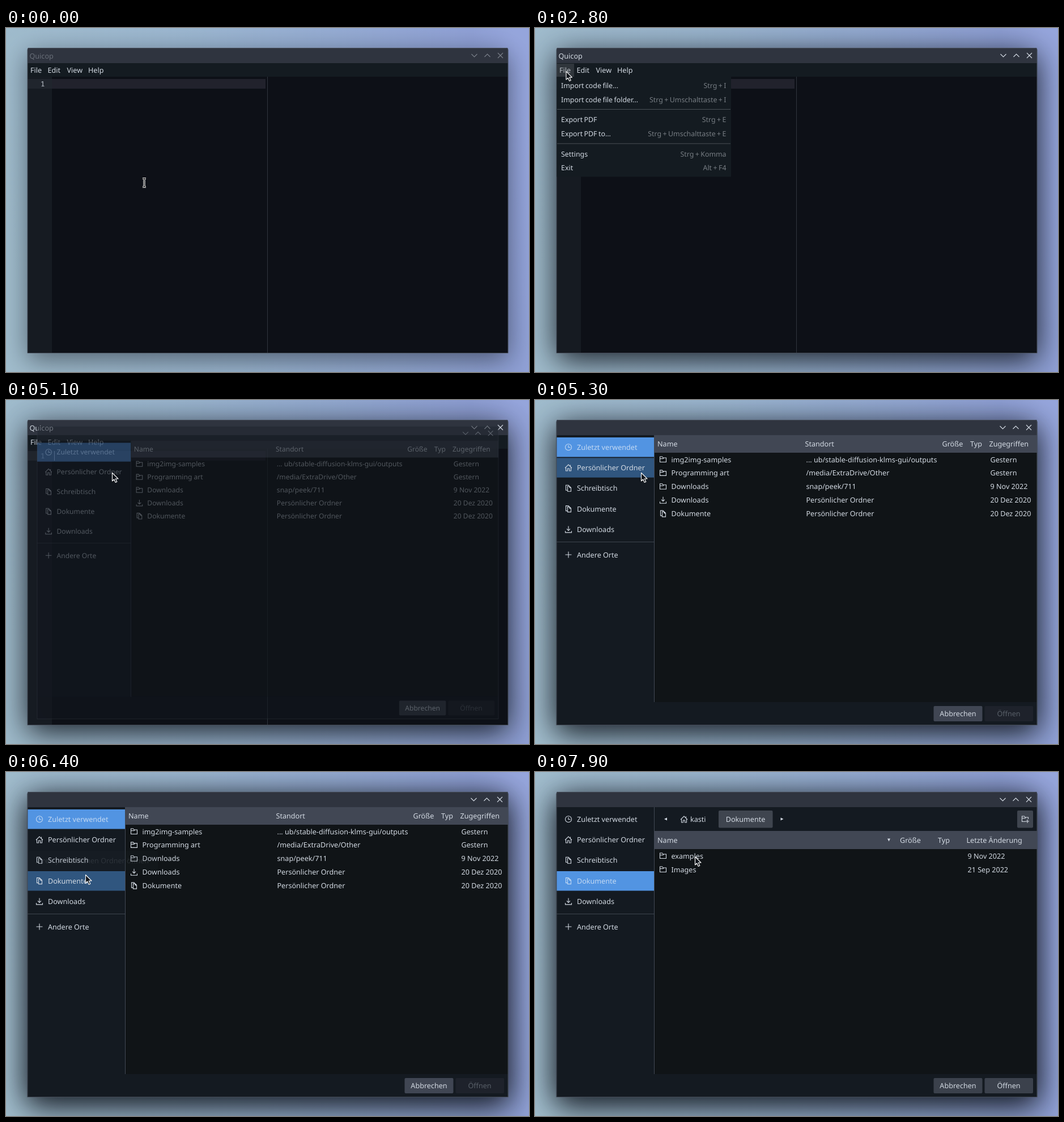
These frames come from a looping animation (923x607 px, 8000 ms). An HTML page with a canvas:

```html
<!DOCTYPE html>
<html lang="de">
<head>
<meta charset="utf-8">
<style>
html, body { margin: 0; width: 100%; height: 100%; overflow: hidden; background: #9cb5cd; }
canvas { display: block; }
</style>
</head>
<body>
<canvas id="stage" width="923" height="607"></canvas>
<script>
const ctx = document.getElementById('stage').getContext('2d');
const LOOP = 8000;
const FG = '#d3dae3', DIM = '#777d83', PANEL = '#141a21', BLUE = '#5294e2';

// pointer tip: time, x, y
const PATH = [
  [400, 244, 273], [1300, 56, 87], [1600, 48, 70], [2400, 48, 70], [2500, 49, 74],
  [2700, 49, 74], [3600, 208, 135], [4200, 187, 128], [5900, 187, 128],
  [6400, 140, 181], [6700, 140, 183], [7100, 140, 186], [7500, 176, 166], [7900, 282, 149]
];

const ICONS = {
  clock: 'M5.5 0A5.5 5.5 0 1 1 -5.5 0A5.5 5.5 0 1 1 5.5 0M0 -3.5V.5H3.5',
  home: 'M-6 .5L0 -5.5L6 .5M-4.5 0V5.5H-1.5V1.5H1.5V5.5H4.5V0M3.5 -5V-3',
  docs: 'M-1.5 -3.5H2L4.5 -1V5.5H-1.5ZM2 -3.5V-1H4.5M-2 3.5H-4.5V-5.5H0L1.5 -4',
  down: 'M0 -6V2M-3 -1L0 2L3 -1M-5.5 2.5V5.5H5.5V2.5',
  plus: 'M-5.5 0H5.5M0 -5.5V5.5',
  folder: 'M-5.5 -5H-1.5L0 -3H5.5V4.5H-5.5ZM-5.5 -1.5H0L1.5 -3',
  newFolder: 'M1 4.5H-5.5V-5H-1.5L0 -3H5.5V0M-5.5 -1.5H0L1.5 -3M4 1V7M1 4H7',
  low: 'M-5 -2.5L0 2.5L5 -2.5',
  high: 'M-5 2.5L0 -2.5L5 2.5',
  close: 'M-4.5 -4.5L4.5 4.5M4.5 -4.5L-4.5 4.5'
};

const clamp = v => Math.max(0, Math.min(1, v));
const ramp = (t, from, to) => clamp((t - from) / (to - from));

function rect(x, y, w, h, color, r = 0) {
  ctx.fillStyle = color;
  ctx.beginPath();
  ctx.roundRect(x, y, w, h, r);
  ctx.fill();
}

function icon(name, x, y, color = FG) {
  ctx.save();
  ctx.translate(x, y);
  ctx.strokeStyle = color;
  ctx.lineWidth = 1.1;
  ctx.stroke(new Path2D(ICONS[name]));
  ctx.restore();
}

// y is the middle of the capitals
function text(s, x, y, color = FG, align = 'left', size = 12.6) {
  ctx.font = `${size}px "Noto Sans", sans-serif`;
  ctx.textAlign = align;
  ctx.fillStyle = color;
  ctx.fillText(s, x, y + 4.5);
}

function triangle(x, y, dx, dy) {
  ctx.fillStyle = FG;
  ctx.beginPath();
  ctx.moveTo(x + dx, y + dy);
  ctx.lineTo(x - dx - dy, y - dy - dx);
  ctx.lineTo(x - dx + dy, y - dy + dx);
  ctx.fill();
}

function pointerAt(t) {
  let i = PATH.findIndex(p => p[0] >= t);
  if (i < 0) i = PATH.length - 1;
  if (i === 0) return PATH[0].slice(1);
  const [t0, x0, y0] = PATH[i - 1], [t1, x1, y1] = PATH[i];
  const k = ramp(t, t0, t1), e = k * k * (3 - 2 * k);
  return [x0 + (x1 - x0) * e, y0 + (y1 - y0) * e];
}

function wallpaper() {
  const g = ctx.createLinearGradient(0, 330, 923, 200);
  g.addColorStop(0, '#9fbbcb');
  g.addColorStop(.4, '#9ab5cf');
  g.addColorStop(.7, '#93a9d2');
  g.addColorStop(.92, '#8e9fd4');
  g.addColorStop(1, '#95a5dc');
  rect(0, 0, 923, 607, g);
}

function shadow(alpha, blur, dy) {
  ctx.save();
  ctx.shadowColor = `rgba(8,12,20,${alpha})`;
  ctx.shadowBlur = blur;
  ctx.shadowOffsetY = dy;
  rect(38, 35, 848, 539, '#0d1017', 3);
  ctx.restore();
}

function frame(shift, color) {
  rect(38, 35, 848, 27, '#2f343f', [3, 3, 0, 0]);
  ['low', 'high', 'close'].forEach((n, i) => icon(n, 826.5 - shift + 23 * i, 48.5, color));
}

function border() {
  ctx.strokeStyle = '#454c58';
  ctx.lineWidth = 1;
  ctx.beginPath();
  ctx.roundRect(38, 35.5, 848, 538, [3, 3, 0, 0]);
  ctx.stroke();
}

function editor(t, menuAlpha) {
  const active = t >= 1800, titleColor = active ? FG : '#686e78';
  rect(38, 62, 848, 511, '#0d1017');
  frame(0, active ? FG : '#7b818b');
  text('Quicop', 41.5, 49, titleColor);
  rect(38, 62, 848, 24, '#141b21');
  rect(38, 86, 43, 487, '#161b22');
  rect(38, 90, 43, 17, '#20252d');
  rect(81, 90, 377, 17, '#21222c');
  rect(461, 86, 1, 487, '#30353d');
  ctx.font = '12.5px "Noto Sans Mono", monospace';
  ctx.textAlign = 'left';
  ctx.fillStyle = '#c5ccd5';
  ctx.fillText('1', 61, 103);
  if (active) rect(85, 90, 1, 17, '#e6e9ee');
  if (menuAlpha) rect(38, 63, 31, 23, '#30363c');
  [['File', 43], ['Edit', 73.5], ['View', 107.5], ['Help', 145]].forEach(([s, x], i) =>
    text(s, x, 74, menuAlpha && !i ? '#b9bec4' : FG));
  border();
}

function menu(alpha, my) {
  const items = [
    ['Import code file...', 'Strg + I', 101.5],
    ['Import code file folder...', 'Strg + Umschalttaste + I', 126.5],
    ['Export PDF', 'Strg + E', 161.5],
    ['Export PDF to...', 'Strg + Umschalttaste + E', 186.5],
    ['Settings', 'Strg + Komma', 222],
    ['Exit', 'Alt + F4', 246.5]
  ];
  ctx.save();
  ctx.globalAlpha = alpha;
  rect(38.5, 86, 307.5, 176.5, '#141b21');
  rect(39, 143, 306, 1, '#4a5157');
  rect(39, 203.5, 306, 1, '#4a5157');
  ctx.wordSpacing = '-0.8px';
  for (const [label, keys, y] of items) {
    const on = my > 89 && Math.abs(my - y) < 12.5;
    if (on) rect(39, y - 12.5, 306, 25, BLUE);
    text(label, 46, y, on ? '#cfdff2' : FG, 'left', 12.4);
    text(keys, 337.5, y, on ? '#f0f5fb' : DIM, 'right', 12.4);
  }
  ctx.restore();
}

function sidebar(selected, hover) {
  const rows = [['clock', 'Zuletzt verwendet'], ['home', 'Persönlicher Ordner'],
    ['docs', 'Schreibtisch'], ['docs', 'Dokumente'], ['down', 'Downloads']];
  rect(38, 62, 172, 471, PANEL);
  rows.forEach(([pic, label], i) => {
    const y = 83.2 + 36.3 * i, on = i === selected;
    if (on || i === hover) rect(38, y - 17.2, 172, 34.5, on ? BLUE : '#30567f');
    const color = on ? '#c3d9f3' : FG;
    icon(pic, 59, y, color);
    text(label, 74, y, color);
  });
  rect(38, 250, 172, 1, '#3e454e');
  icon('plus', 59, 273);
  text('Andere Orte', 74, 273);
  rect(210, 62, 1, 471, '#414854');
}

function header(y, h, labels) {
  rect(211, y, 675, h, '#414754');
  for (const [s, x] of labels) text(s, x, y + h / 2);
}

function recentList() {
  header(62, 31, [['Name', 216], ['Standort', 476.5], ['Größe', 718.5], ['Typ', 768], ['Zugegriffen', 801.5]]);
  const home = 'Persönlicher Ordner';
  [
    ['folder', 'img2img-samples', '... ub/stable-diffusion-klms-gui/outputs', 'Gestern'],
    ['folder', 'Programming art', '/media/ExtraDrive/Other', 'Gestern'],
    ['folder', 'Downloads', 'snap/peek/711', '9 Nov 2022'],
    ['down', 'Downloads', home, '20 Dez 2020'],
    ['docs', 'Dokumente', home, '20 Dez 2020']
  ].forEach(([pic, name, place, date], i) => {
    const y = 105 + 23.9 * i;
    icon(pic, 226, y);
    text(name, 240.5, y);
    text(place, 478.5, y);
    text(date, 803.5, y);
  });
}

function folderList() {
  rect(211, 62, 675, 42, PANEL);
  triangle(230.5, 83, -2.5, 0);
  triangle(436, 83, 2.5, 0);
  icon('home', 263, 83.5);
  text('kasti', 274, 83);
  rect(324, 68, 95.5, 30.5, '#3f454f', 2);
  text('Dokumente', 371.5, 83, FG, 'center');
  rect(851, 68, 28, 30.5, '#3f454f', 2);
  icon('newFolder', 865, 83);
  header(104, 32, [['Name', 216], ['Größe', 644], ['Typ', 711], ['Letzte Änderung', 761.5]]);
  triangle(624.5, 120, 0, 2.5);
  [['examples', '9 Nov 2022'], ['Images', '21 Sep 2022']].forEach(([name, date], i) => {
    const y = 148 + 24 * i;
    icon('folder', 226, y);
    text(name, 240.5, y);
    text(date, 763.5, y);
  });
}

function dialog(t, mx, my) {
  const opened = t >= 6900;
  const row = Math.floor((my - 65) / 36.3);
  rect(38, 62, 848, 511, PANEL);
  rect(211, 62, 675, 471, '#101417');
  frame(1, FG);
  sidebar(opened ? 3 : 0, t >= 5300 && mx < 210 ? row : -1);
  opened ? folderList() : recentList();
  rect(703.5, 540, 86, 27, opened ? '#3b414c' : '#404653', 2);
  text('Abbrechen', 746.5, 553.5, FG, 'center');
  rect(793.5, 540, 85.5, 27, opened ? '#3b414c' : '#1e222b', 2);
  text('Öffnen', 836, 553.5, opened ? FG : '#596069', 'center');
  border();
}

function tooltip(alpha) {
  if (!alpha) return;
  ctx.save();
  ctx.globalAlpha = alpha;
  rect(40, 139, 228, 34, '#222b36', 3);
  text('Ihren persönlichen Ordner öffnen', 52, 156);
  ctx.restore();
}

function pointer(t, x, y) {
  ctx.save();
  ctx.translate(x, y);
  ctx.lineJoin = 'round';
  if (t < 1300 && x > 81) {
    const beam = new Path2D('M-3 -7.5H-1L0 -6.5L1 -7.5H3M-3 7.5H-1L0 6.5L1 7.5H3M0 -6.5V6.5');
    for (const [w, c] of [[3.2, '#fff'], [1.1, '#000']]) {
      ctx.lineWidth = w;
      ctx.strokeStyle = c;
      ctx.stroke(beam);
    }
  } else {
    const arrow = new Path2D('M.5 .5V15L3.7 12L6.2 17.5L8.8 16.3L6.3 11H11Z');
    ctx.fillStyle = '#10151b';
    ctx.fill(arrow);
    ctx.strokeStyle = '#fff';
    ctx.lineWidth = 1.1;
    ctx.stroke(arrow);
  }
  ctx.restore();
}

function draw(now) {
  const t = Math.floor(now % LOOP / 100) * 100; // ten pictures a second
  const [mx, my] = pointerAt(t);
  const focus = ramp(t, 1800, 2100);
  const menuAlpha = t < 5000 ? ramp(t, 1800, 2000) : 0;
  const open = ramp(t, 5000, 5300);

  ctx.textRendering = 'geometricPrecision';
  wallpaper();
  shadow(.5 + .4 * focus, 46 + 8 * focus, 12);
  editor(t, menuAlpha);
  if (menuAlpha) menu(menuAlpha, my);

  if (open) {
    const scale = .94 + .06 * open;
    ctx.save();
    ctx.globalAlpha = open;
    ctx.translate(462, 304);
    ctx.scale(scale, scale);
    ctx.translate(-462, -304);
    shadow(.35 * ramp(t, 5000, 5500), 54, 12);
    dialog(t, mx, my);
    ctx.restore();
  }
  tooltip(t < 6200 ? ramp(t, 5700, 5900) : .12 + .88 * ramp(-t, -6400, -6100) - .12 * ramp(t, 6400, 6600));
  pointer(t, mx, my);
  requestAnimationFrame(draw);
}
requestAnimationFrame(draw);
</script>
</body>
</html>
```
